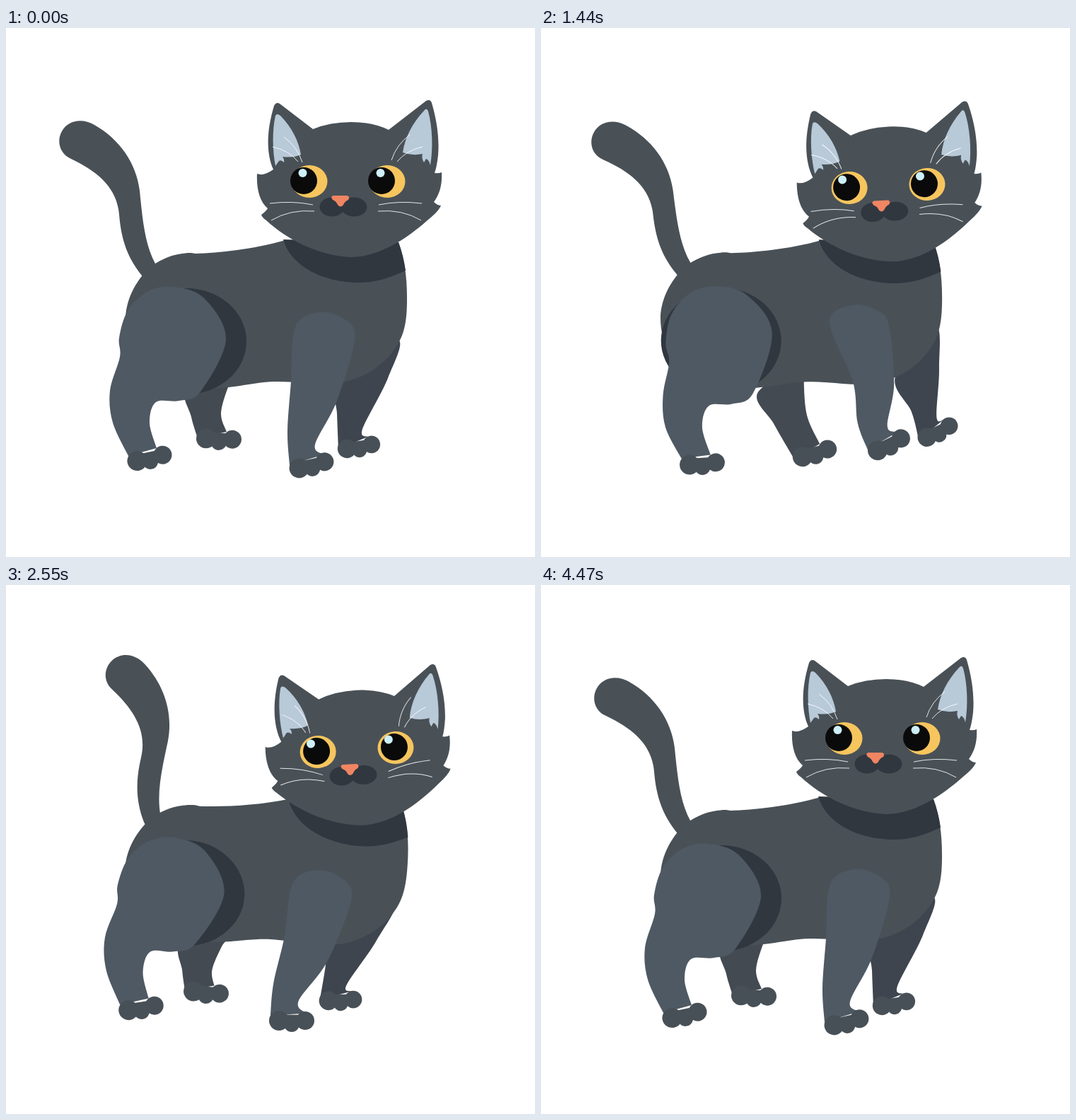
Write an HTML page that moves like this. It is 748 by 748 pixels and loops after 4.5 s.

```html
<!DOCTYPE html>
<html lang="en">
<head>
<meta charset="utf-8">
<title>Cat</title>
<style>
html, body { margin: 0; width: 100%; height: 100%; overflow: hidden; background: #fff; }
svg { display: block; width: 100vw; height: 100vh; }
.fur { fill: #495157; }
.near { fill: #4f5963; }
.farHind { fill: #434a51; }
.farFront { fill: #3e454f; }
.paw { fill: #485057; }
.dark { fill: #30373f; }
.ear { fill: #b8c9d8; }
.whisker { fill: none; stroke: #fff; stroke-width: 1; stroke-opacity: .85; }
</style>
</head>
<body>
<svg viewBox="0 0 748 748">
  <defs>
    <g id="pawShape" class="paw">
      <circle cx="-18" r="14"/><circle cy="5" r="11"/><circle cx="19" r="13"/>
      <path d="M-29 -9L16 -8V8H-18Z"/>
    </g>
  </defs>
  <path id="tail" class="fur" d="M192 350C172 325 163 300 160 264C157 226 130 203 92 185C74 177 72 158 79 146C88 130 108 127 125 137C160 157 184 190 189 230C193 270 196 305 211 333L232 358L215 372Z"/>
  <g id="far"></g>
  <g id="body">
    <path class="fur" d="M262 318C240 318 222 325 205 337C185 355 170 382 169 410C169 428 173 442 178 452C190 480 215 510 290 510C335 508 350 500 385 500C420 500 440 507 480 500C515 492 540 470 552 450C566 430 567 405 567 382C567 350 563 325 555 303L395 300C350 313 300 318 268 319Z"/>
    <ellipse class="dark" cx="255" cy="443" rx="85" ry="75"/>
    <path class="dark" d="M392 299C402 335 445 360 500 360C525 360 545 352 565 343Q562 322 555 303Z"/>
  </g>
  <g id="near"></g>
  <g id="head">
    <path class="fur" d="M434 143Q458 133 488 133T541 144L594 103Q600 100 602 106C609 130 613 155 611 180Q609 197 606 205Q612 206 616 204C617 222 613 235 605 246Q610 251 615 251Q612 259 597 271C570 295 530 324 487 324C440 322 395 297 368 272Q362 268 361 264Q368 259 370 255C358 245 354 226 355 206Q364 210 378 200C369 180 367 150 379 110Q382 104 387 107Z"/>
    <path class="ear" d="M381 124Q383 120 388 124C404 140 414 160 417 179Q406 184 391 182Q394 186 393 190Q389 186 386 188L381 195C377 175 376 145 381 124Z"/>
    <path class="ear" d="M591 117Q595 112 597 118C603 140 604 170 600 194Q598 186 594 185L591 190Q587 184 589 178Q574 181 561 176C564 155 575 134 591 117Z"/>
    <g id="eyes"></g>
    <ellipse class="dark" cx="461" cy="253" rx="17.5" ry="13.5"/>
    <ellipse class="dark" cx="492" cy="253" rx="18.5" ry="13.5"/>
    <path fill="#f08562" d="M463 237H482Q487 238 484 243Q479 245 477 250Q473 255 469 250Q467 245 462 243Q458 238 463 237Z"/>
    <g id="whiskers"></g>
  </g>
</svg>
<script>
const LOOP = 4500, PIVOT = [364, 400], TAIL = [203, 345], FACE = [483, 216];
const $ = id => document.getElementById(id);

function add(parent, tag, attrs) {
  const el = document.createElementNS('http://www.w3.org/2000/svg', tag);
  for (const k in attrs) el.setAttribute(k, attrs[k]);
  return parent.appendChild(el);
}

// Monotone cubic interpolation through keyed rows of numbers.
function track(times, rows) {
  const n = times.length;
  const curves = rows[0].map((_, c) => {
    const v = rows.map(r => r[c]);
    const slope = i => (v[i + 1] - v[i]) / (times[i + 1] - times[i]);
    const m = v.map((_, i) => {
      if (i === 0 || i === n - 1) return 0;
      const a = slope(i - 1), b = slope(i);
      return a * b <= 0 ? 0 : 2 * a * b / (a + b);
    });
    return (i, u, h) => {
      const w = 1 - u;
      return v[i] * (1 + 2 * u) * w * w + v[i + 1] * u * u * (3 - 2 * u)
        + h * u * w * (m[i] * w - m[i + 1] * u);
    };
  });
  return t => {
    let i = 0;
    while (i < n - 2 && t >= times[i + 1]) i++;
    const h = times[i + 1] - times[i], u = (t - times[i]) / h;
    return curves.map(f => f(i, u, h));
  };
}

// Each key: time, then values.
const keyed = (...keys) => track(keys.map(k => k[0]), keys.map(k => k.slice(1)));
const clamp = x => Math.max(0, Math.min(1, x));
const mix = (a, b, w) => [a[0] + (b[0] - a[0]) * w, a[1] + (b[1] - a[1]) * w];

function turn(x, y, deg, [cx, cy] = PIVOT) {
  const a = deg * Math.PI / 180, c = Math.cos(a), s = Math.sin(a);
  x -= cx; y -= cy;
  return [cx + x * c - y * s, cy + x * s + y * c];
}

const bodyTurn = keyed([0, 0], [540, 9.7], [620, 10], [840, 7.7], [1080, 3.7], [1470, .4],
  [1650, 2.6], [2010, 9.9], [2080, 10.1], [2190, 9.3], [2550, 3.9], [3020, 0], [LOOP, 0]);
const tailTurn = keyed([0, 0], [540, 24], [720, 32], [840, 30], [1080, 17.9], [1440, -1.4], [1550, -2.3],
  [2010, 11.3], [2400, 19.5], [2700, 14.5], [3240, -3], [3480, -9.4], [3640, -11.2], [4350, -.5], [LOOP, 0]);
// dx, dy, tilt
const headMove = keyed([0, 0, 0, 0], [540, 29, 40, -1.5], [610, 30, 42, -2.6], [840, 23.5, 35.5, -5.8],
  [1460, 7, 6.5, -2.5], [2010, 30, 43, 1], [2190, 28, 40, -.6], [2550, 12, 16, -3.1],
  [3000, 0, -4, -1.2], [3330, 0, 0, 0], [LOOP, 0, 0, 0]);
const pupilShift = keyed([0, -8], [840, -7], [1440, -4], [2010, -.5], [2550, -2], [3480, -7.5], [3900, -8], [LOOP, -8]);
const whiskerTurn = keyed([0, 0], [540, 15], [840, 14], [1460, 0], [2010, 15], [2550, 10], [3000, 0], [LOOP, 0]);

const STEPS = [0, 150, 840, 1440, 2010, 2550, 3020, LOOP];

// A limb with hip, knee and paw. Outline runs from rear ankle over the hip to front ankle.
// Each pose: hip dx, hip dy, thigh turn, paw x, y, angle, knee width.
function leg(layer, cls, size, rig, outline, ...poses) {
  const rest = [0, 0, 0, ...rig.foot, rig.angle, 1];
  const rows = [rest, rest, ...poses, rest, rest].map((p, k) => {
    const a = bodyTurn(STEPS[k])[0];
    return [p[0], p[1], p[2], ...turn(p[3], p[4], -a), p[5] - a, p[6]];
  });
  const limb = add($(layer), 'path', { class: cls });
  const paw = add($(layer), 'use', { href: '#pawShape' });
  const { hip, knee, foot, cap, angle } = rig;
  const shin = [foot[0] - knee[0], foot[1] - knee[1]], length = Math.hypot(...shin);
  const move = track(STEPS, rows);

  return (t, tilt) => {
    const [hx, hy, thigh, fx, fy, pawTurn, slim] = move(t);
    const upper = (x, y, f) => {
      const [a, b] = turn(x, y, thigh * f, hip);
      return [a + hx, b + hy];
    };
    const bent = upper(...knee, 1);
    const bone = [fx - bent[0], fy - bent[1]], reach = Math.hypot(...bone);
    const lower = (x, y) => {
      const u = x - knee[0], v = y - knee[1];
      const along = (u * shin[0] + v * shin[1]) / length * reach / length;
      const side = (u * shin[1] - v * shin[0]) / length;
      return [bent[0] + (along * bone[0] + side * bone[1]) / reach,
        bent[1] + (along * bone[1] - side * bone[0]) / reach];
    };
    const points = outline.map(([x, y], i) => {
      let p;
      if (i === 0 || i === outline.length - 1) {
        const [a, b] = turn(x, y, pawTurn - angle, foot);
        p = [a + fx - foot[0], b + fy - foot[1]];
      } else {
        const near = Math.max(0, 1 - Math.abs(y - knee[1]) / 60);
        const thin = knee[0] + (x - knee[0]) * (1 + (slim - 1) * near);
        const f = clamp((y - cap) / (knee[1] - cap));
        p = mix(upper(thin, y, f), lower(thin, y), clamp((y - knee[1]) / 80 + .5));
      }
      return turn(...p, tilt);
    });
    limb.setAttribute('d', smooth(points));
    paw.setAttribute('transform', `translate(${turn(fx, fy, tilt)}) rotate(${pawTurn + tilt}) scale(${size})`);
  };
}

const hindFar = leg('far', 'farHind', 1,
  { hip: [285, 480], knee: [281, 522], foot: [301, 581], cap: 0, angle: 2 },
  [[271, 580], [262, 550], [256, 510], [325, 490], [314, 508], [304, 545], [312, 571]],
  [38, 4, -20, 355, 583, -14, 1], [45, 1, -20, 387, 601, -17, 1.2],
  [6, 12, 0, 269, 577, 14, 1], [-1, 5, 0, 283, 576, 5, 1]);
const foreFar = leg('far', 'farFront', .95,
  { hip: [515, 450], knee: [500, 510], foot: [499, 592], cap: 0, angle: -10 },
  [[470, 595], [468, 545], [466, 480], [553, 440], [540, 495], [504, 567], [512, 578]],
  [12, -15, -28, 511, 581, 0, .75], [12, -5, -28, 561, 571, -27, .7],
  [5, -15, -16, 498, 601, -5, .9], [-3, -5, 3, 473, 587, -3, .85]);
const hindNear = leg('near', 'near', 1,
  { hip: [235, 420], knee: [187, 500], foot: [203, 608], cap: 0, angle: -13 },
  [[173, 605], [151, 558], [147, 513], [161, 465], [160, 438], [172, 400], [200, 373], [237, 366],
    [280, 382], [311, 440], [275, 514], [245, 527], [212, 529], [203, 558], [213, 594]],
  [10, 3, -22, 256, 603, -15, 1], [14, 0, -8, 228, 616, -5, 1],
  [0, 0, 0, 167, 576, 0, 1], [0, 0, 0, 191, 598, -10, 1]);
const foreNear = leg('near', 'near', 1,
  { hip: [450, 440], knee: [437, 510], foot: [432, 618], cap: 410, angle: -14 },
  [[401, 618], [398, 570], [403, 500], [409, 423], [443, 402], [479, 412], [493, 440], [468, 527], [437, 589], [450, 603]],
  [-4, -13, -30, 434, 585, -2, .78], [0, -11, -28, 492, 589, -27, .72],
  [-3, -12, -12, 403, 611, 3, 1], [-2, -4, 1, 404, 616, 0, 1]);

const pupils = [429, 539].map(x => {
  add($('eyes'), 'ellipse', { cx: x, cy: 217, rx: 25.5, ry: 23, fill: '#f6c55e' });
  const pupil = add($('eyes'), 'circle', { cx: x, cy: 216, r: 19, fill: '#0a0a0a' });
  add($('eyes'), 'circle', { cx: x - 9.5, cy: 205, r: 6, fill: '#cdf0f8' });
  return pupil;
});

// Left root, right root, then control and tip offsets mirrored on the right.
const whiskers = [];
function whiskerPair(left, right, a, b, c, d) {
  for (const [root, side] of [[left, 1], [right, -1]]) {
    const el = add($('whiskers'), 'path', { class: 'whisker', d: `M${root}q${a * side} ${b} ${c * side} ${d}` });
    whiskers.push({ el, root, side });
  }
}
whiskerPair([434, 250], [527, 250], -29, -6, -61, -2);
whiskerPair([436, 259], [526, 259], -34, -3, -61, 13);
whiskerPair([419, 190], [545, 187], -7, -22, -26, -36);
whiskerPair([413, 189], [553, 189], -13, -16, -36, -21);

function smooth(p) {
  let d = 'M' + p[0];
  for (let i = 0; i < p.length - 1; i++) {
    const a = p[Math.max(0, i - 1)], b = p[i], c = p[i + 1], e = p[Math.min(p.length - 1, i + 2)];
    const from = [0, 1].map(k => b[k] + (c[k] - a[k]) / 6);
    const to = [0, 1].map(k => c[k] - (e[k] - b[k]) / 6);
    d += `C${from} ${to} ${c}`;
  }
  return d + 'Z';
}

function draw(t) {
  const [tilt] = bodyTurn(t);
  $('body').setAttribute('transform', `rotate(${tilt} ${PIVOT})`);

  const root = turn(...TAIL, tilt);
  $('tail').setAttribute('transform', `translate(${root}) rotate(${tailTurn(t)}) translate(${-TAIL[0]} ${-TAIL[1]})`);

  for (const pose of [hindFar, foreFar, hindNear, foreNear]) pose(t, tilt);

  const [dx, dy, nod] = headMove(t);
  $('head').setAttribute('transform', `translate(${dx} ${dy}) rotate(${nod} ${FACE})`);
  const look = pupilShift(t)[0], flick = whiskerTurn(t)[0];
  for (const p of pupils) p.setAttribute('transform', `translate(${look} 0)`);
  for (const w of whiskers) w.el.setAttribute('transform', `rotate(${flick * w.side} ${w.root})`);
}

let start;
function tick(now) {
  if (start === undefined) start = now;
  draw((now - start) % LOOP);
  requestAnimationFrame(tick);
}
draw(0);
requestAnimationFrame(tick);
</script>
</body>
</html>
```
